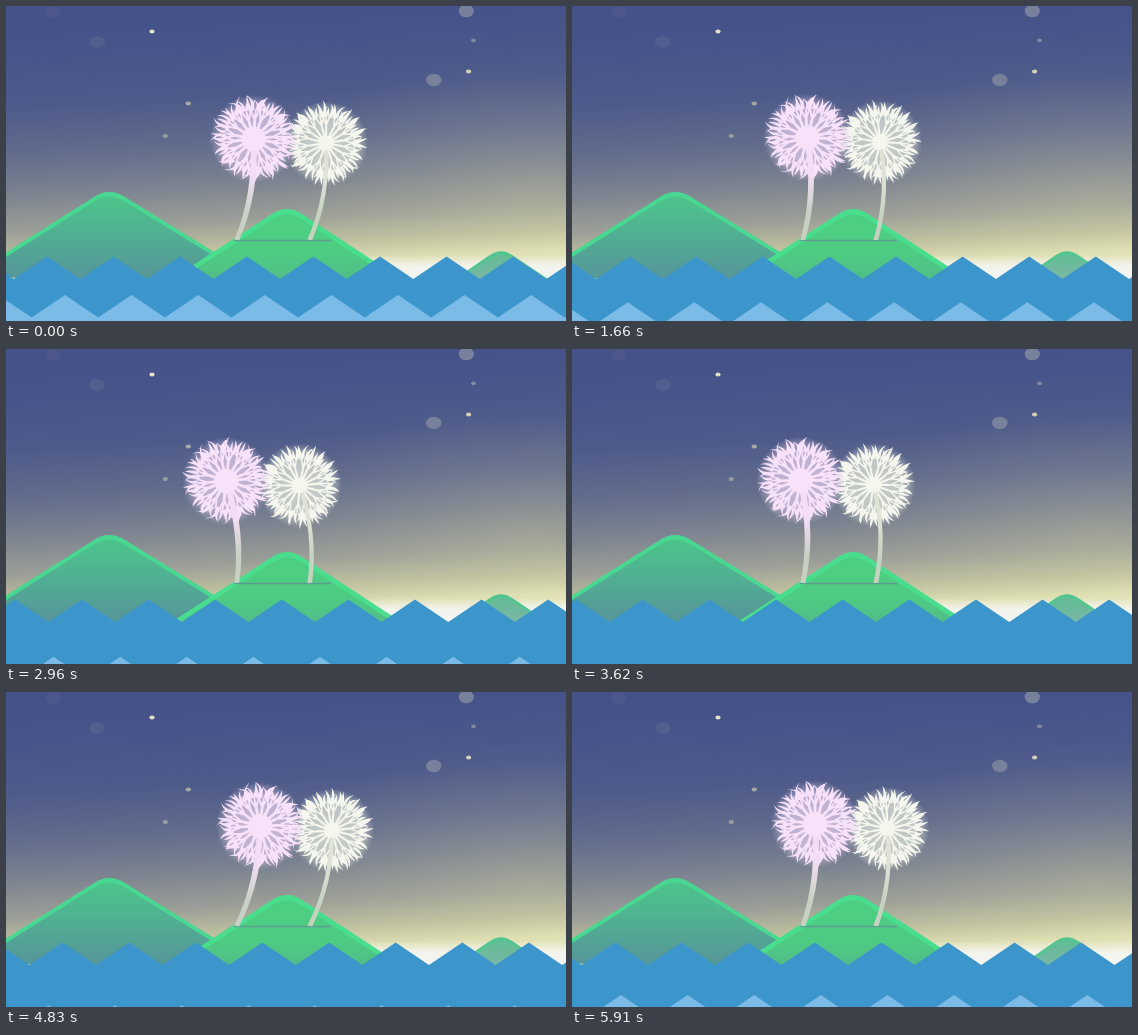
These frames come from a looping animation (560 px wide and 315 px high, 6.04 s). An HTML page:

```html
<!DOCTYPE html>
<html lang="en">
<head>
<meta charset="utf-8">
<title>Dandelions by the water</title>
<style>
  html, body { margin: 0; width: 100%; height: 100%; overflow: hidden; background: #46538a; }
  svg { display: block; width: 560px; height: 315px; }
</style>
</head>
<body>
<svg id="stage" viewBox="0 0 560 315" xmlns="http://www.w3.org/2000/svg">
  <defs>
    <linearGradient id="sky" gradientUnits="userSpaceOnUse" x1="400" y1="0" x2="415" y2="276">
      <stop offset="0" stop-color="#45528a"/>
      <stop offset=".28" stop-color="#4d5a8a"/>
      <stop offset=".46" stop-color="#626c8c"/>
      <stop offset=".6" stop-color="#7b8290"/>
      <stop offset=".74" stop-color="#9c9f97"/>
      <stop offset=".84" stop-color="#c0c1a0"/>
      <stop offset=".91" stop-color="#dfe0b4"/>
      <stop offset="1" stop-color="#eeefcd"/>
    </linearGradient>
    <radialGradient id="dawn" gradientUnits="userSpaceOnUse" cx="0" cy="0" r="1"
      gradientTransform="translate(520 190) scale(250 140)">
      <stop offset="0" stop-color="#dcdaa8" stop-opacity=".2"/>
      <stop offset="1" stop-color="#d8d6b0" stop-opacity="0"/>
    </radialGradient>
    <linearGradient id="mist" x1="0" y1="0" x2="0" y2="1">
      <stop offset="0" stop-color="#f4f5f2" stop-opacity="0"/>
      <stop offset=".45" stop-color="#f4f5f2" stop-opacity=".9"/>
      <stop offset="1" stop-color="#f4f5f2"/>
    </linearGradient>
    <linearGradient id="hillLeft" x1="0" y1="0" x2="0" y2="1">
      <stop offset="0" stop-color="#4cc58a"/>
      <stop offset=".45" stop-color="#51ad93"/>
      <stop offset=".8" stop-color="#559a98"/>
      <stop offset="1" stop-color="#589698"/>
    </linearGradient>
    <linearGradient id="hillMid" x1="0" y1="0" x2="0" y2="1">
      <stop offset="0" stop-color="#4ccf82"/>
      <stop offset=".55" stop-color="#4ecb83"/>
      <stop offset="1" stop-color="#52b889"/>
    </linearGradient>
    <linearGradient id="hillRight" x1="0" y1="0" x2="0" y2="1">
      <stop offset="0" stop-color="#62bd94"/>
      <stop offset="1" stop-color="#7fb5ab"/>
    </linearGradient>
  </defs>
  <rect width="560" height="315" fill="url(#sky)"/>
  <rect width="560" height="315" fill="url(#dawn)"/>
  <rect x="360" y="249" width="200" height="26" fill="url(#mist)"/>
  <g id="stars"></g>
  <g id="hills"></g>
  <path d="M228 234.5H325" stroke="#5c9c92" stroke-width="1.6"/>
  <g id="flowers"></g>
  <path id="back" fill="#3c95cb"/>
  <path id="front" fill="#7bbbe7"/>
</svg>
<script>
const $ = id => document.getElementById(id);
const fix = n => n.toFixed(2);

// x, y, rx, ry, colour
$('stars').innerHTML = [
  [47, 6, 7.5, 6, '#4c588c'], [91, 36, 8, 6, '#525e8e'],
  [146, 25.5, 2.6, 2, '#e2e2c8'], [182.3, 97.5, 2.7, 2, '#a5aaa4'],
  [159.3, 130, 2.7, 2, '#989e9c'], [460.3, 5, 7.6, 6.3, '#78819b'],
  [427.8, 74, 7.7, 6.2, '#78819c'], [467.5, 34.3, 2.4, 1.9, '#848a9b'],
  [462.6, 65.5, 2.6, 1.9, '#d2d2b8']
].map(([x, y, rx, ry, c]) =>
  `<ellipse cx="${x}" cy="${y}" rx="${rx}" ry="${ry}" fill="${c}"/>`).join('');

const hill = (d, rim, body, drop) =>
  `<path d="${d}" fill="${rim}"/><path d="${d}" fill="url(#${body})" transform="translate(0 ${drop})"/>`;
$('hills').innerHTML =
  hill('M-30 265.5L88 191Q103 181 119 191L260 278Z', '#48d892', 'hillLeft', 4.5) +
  hill('M446 275L483 249.5Q495 241 507 249.5L545 275Z', '#54c490', 'hillRight', 3.5) +
  hill('M160 276.5L266 208Q281 198 296 208L400 276Z', '#48de8e', 'hillMid', 5.5);

function random(seed) {
  return () => (seed = (seed * 16807) % 2147483647) / 2147483647;
}

const polar = (r, a) => [r * Math.cos(a), r * Math.sin(a)];

// A tapering curved blade between two polar points
function blade(r0, a0, r1, a1, bend, w) {
  const [x0, y0] = polar(r0, a0), [x1, y1] = polar(r1, a1);
  const [cx, cy] = polar(r0 + (r1 - r0) * .6, a0 + bend);
  const nx = -Math.sin(a0) * w / 2, ny = Math.cos(a0) * w / 2;
  const p = (x, y) => fix(x) + ' ' + fix(y);
  return `M${p(x0 + nx, y0 + ny)}Q${p(cx + nx, cy + ny)} ${p(x1, y1)}` +
    `Q${p(cx - nx, cy - ny)} ${p(x0 - nx, y0 - ny)}Z`;
}

function head({ radius, core, seed, spokes, spoke }) {
  const rnd = random(seed), k = radius / 44;
  let d = '';
  for (let i = 0; i < spokes; i++) {
    const a = (i + rnd() * .35) / spokes * Math.PI * 2;
    d += blade(core - 1, a, (33 + rnd() * 5) * k, a + (rnd() - .5) * .1, 0, spoke);
    for (const side of [-1, 1]) {
      const spread = side * (.17 + rnd() * .06);
      const curl = (rnd() - .5) * .3;
      d += blade(19 * k, a, 34 * k, a + spread, spread * .7, spoke * .8);
      d += blade(27 * k, a + spread * .7, (41 + rnd() * 5) * k,
        a + spread * .7 + curl, spread * .6 - curl * .5, 3.6);
      d += blade(29 * k, a + spread * .3, (38 + rnd() * 6) * k,
        a + spread * .3 - curl, curl * .6, 2.8);
    }
  }
  return d;
}

function flower(f) {
  const { id, len, radius, core, ink, haze, top, base, neck } = f;
  return `<defs>
    <linearGradient id="${id}S" gradientUnits="userSpaceOnUse" x1="0" y1="${-len}" x2="0" y2="0">
      <stop offset=".35" stop-color="${top}"/><stop offset=".75" stop-color="${base}"/>
    </linearGradient>
    <radialGradient id="${id}G">
      <stop offset="0" stop-color="${haze}" stop-opacity=".9"/>
      <stop offset=".65" stop-color="${haze}" stop-opacity=".8"/>
      <stop offset=".85" stop-color="${haze}" stop-opacity=".35"/>
      <stop offset="1" stop-color="${haze}" stop-opacity="0"/>
    </radialGradient></defs>
    <g id="${id}">
      <g transform="translate(0 ${-len})">
        <circle r="${radius}" fill="url(#${id}G)"/>
        <path d="${head(f)}" fill="${ink}"/>
        <circle r="${core}" fill="${ink}"/>
      </g>
      <path d="M-2.6 0Q${11.5 - neck} -48 ${-neck} ${-len}H${neck}Q${11.5 + neck} -48 2.2 0Z" fill="url(#${id}S)"/>
      <circle cy="${-len}" r="${core}" fill="${ink}"/>
    </g>`;
}

const blooms = [
  { id: 'cream', x: 304, len: 98, radius: 42, core: 7.5, ink: '#f5f6ee', haze: '#d3d9d0',
    top: '#dfe3d6', base: '#c5d2bf', seed: 811, spokes: 18, spoke: 2.3, neck: 2 },
  { id: 'pink', x: 231, len: 102.5, radius: 44, core: 12, ink: '#f8e2fa', haze: '#d3c1e0',
    top: '#f4def6', base: '#c7d0c2', seed: 4242, spokes: 18, spoke: 3, neck: 3 }
];
$('flowers').innerHTML = blooms.map(flower).join('');

// [ms, value]
const sway = [[520, 9.4], [1130, 4.2], [2130, .6], [2960, -6], [4090, 4], [4830, 13], [5910, 6.7]];
const backX = [[520, 41], [1130, 49.7], [2130, 66.2], [2960, 76], [4090, 65.2], [4830, 56.7], [5910, 43]];
const frontX = [[520, 59], [1130, 57], [2130, 54], [2960, 47.5], [3690, 42.5], [4250, 40.5], [4830, 42.5], [5910, 49]];
const frontY = [[520, 289], [1130, 294], [2130, 299], [2960, 308], [3690, 315.4], [4250, 317.5], [4830, 313.3], [5910, 303]];

// Smooth curve through the keys, flat at turning points
function curve(keys, t) {
  const last = keys.length - 1;
  if (t <= keys[0][0]) return keys[0][1];
  if (t >= keys[last][0]) return keys[last][1];
  const i = keys.findIndex(k => k[0] > t) - 1;
  const slope = n => (keys[n + 1][1] - keys[n][1]) / (keys[n + 1][0] - keys[n][0]);
  const tangent = n => {
    if (n === 0) return slope(0);
    if (n === last) return slope(last - 1);
    const a = slope(n - 1), b = slope(n);
    return a * b <= 0 ? 0 : 2 * a * b / (a + b);
  };
  const [t0, v0] = keys[i], [t1, v1] = keys[i + 1];
  const h = t1 - t0, u = (t - t0) / h, w = 1 - u;
  return v0 * w * w * (1 + 2 * u) + v1 * u * u * (3 - 2 * u) +
    h * u * w * (tangent(i) * w - tangent(i + 1) * u);
}

const PITCH = 66.6;
function zigzag(x, y, depth) {
  let d = 'M-140 340';
  for (let p = x - 2 * PITCH; p < 640; p += PITCH)
    d += `L${fix(p)} ${fix(y)}L${fix(p + PITCH / 2)} ${fix(y + depth)}`;
  return d + 'L700 340Z';
}

const LOOP = 6040, START = 590, STEP = 5320 / 79;
function draw(time) {
  const t = time % LOOP;
  const n = Math.min(79, Math.floor((t - START + 2) / STEP));
  const s = t < START ? 0 : START + n * STEP;
  const angle = fix(curve(sway, s));
  for (const b of blooms)
    $(b.id).setAttribute('transform', `translate(${b.x} 234) rotate(${angle})`);
  $('back').setAttribute('d', zigzag(curve(backX, s), 250.5, 22.5));
  $('front').setAttribute('d', zigzag(curve(frontX, s), curve(frontY, s), 22.5));
}

const begin = performance.now();
function tick() {
  draw(performance.now() - begin);
  requestAnimationFrame(tick);
}
tick();
</script>
</body>
</html>
```
